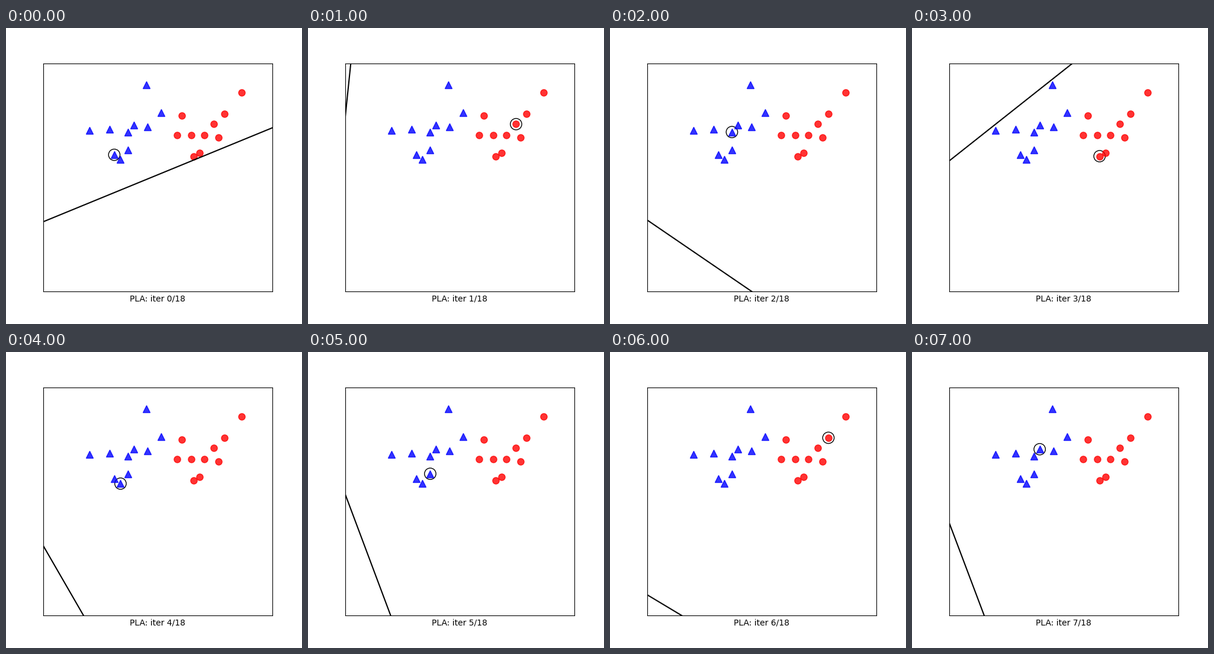
A matplotlib script for the animation above (8 s loop, 500x500 px).

```python
import numpy as np
import matplotlib.pyplot as plt
from matplotlib.animation import FuncAnimation

N = 10
STEPS = 8

# Two correlated Gaussian clouds: long axis (1, 1), short axis (1, -1)
rng = np.random.RandomState(2)
along, across = rng.randn(2 * N, 2).T * np.sqrt([[0.25], [0.05]])
labels = np.repeat([1, -1], N)
xs = np.where(labels > 0, 2, 4) - along - across
ys = 2 - along + across
X = np.column_stack([np.ones(2 * N), xs, ys])


def perceptron(w):
    """Return every weight vector and the misclassified point behind each update."""
    weights, missed = [w], []
    while np.any(np.sign(X @ weights[-1]) != labels):
        for k in rng.permutation(2 * N):
            if np.sign(X[k] @ weights[-1]) != labels[k]:
                missed.append(k)
                weights.append(weights[-1] + labels[k] * X[k])
    return weights, missed


weights, missed = perceptron(rng.randn(3))

fig, ax = plt.subplots(figsize=(5, 5), dpi=100)
ax.plot(xs[:N], ys[:N], 'b^', markersize=8, alpha=0.8)
ax.plot(xs[N:], ys[N:], 'ro', markersize=8, alpha=0.8)
boundary, = ax.plot([], [], 'k')
ring = ax.add_artist(plt.Circle((0, 0), 0.15, color='k', fill=False))
ax.axis([0, 6, -2, 4])
ax.set_xticks([])
ax.set_yticks([])


def update(i):
    w0, w1, w2 = weights[i]
    ends = np.array([-100, 100])
    boundary.set_data(ends, -(w1 * ends + w0) / w2)
    ring.center = X[missed[i], 1:]
    ax.set_xlabel(f'PLA: iter {i}/{len(missed)}')
    return boundary, ring


anim = FuncAnimation(fig, update, frames=STEPS, interval=1000, repeat=True)
plt.show()
```
